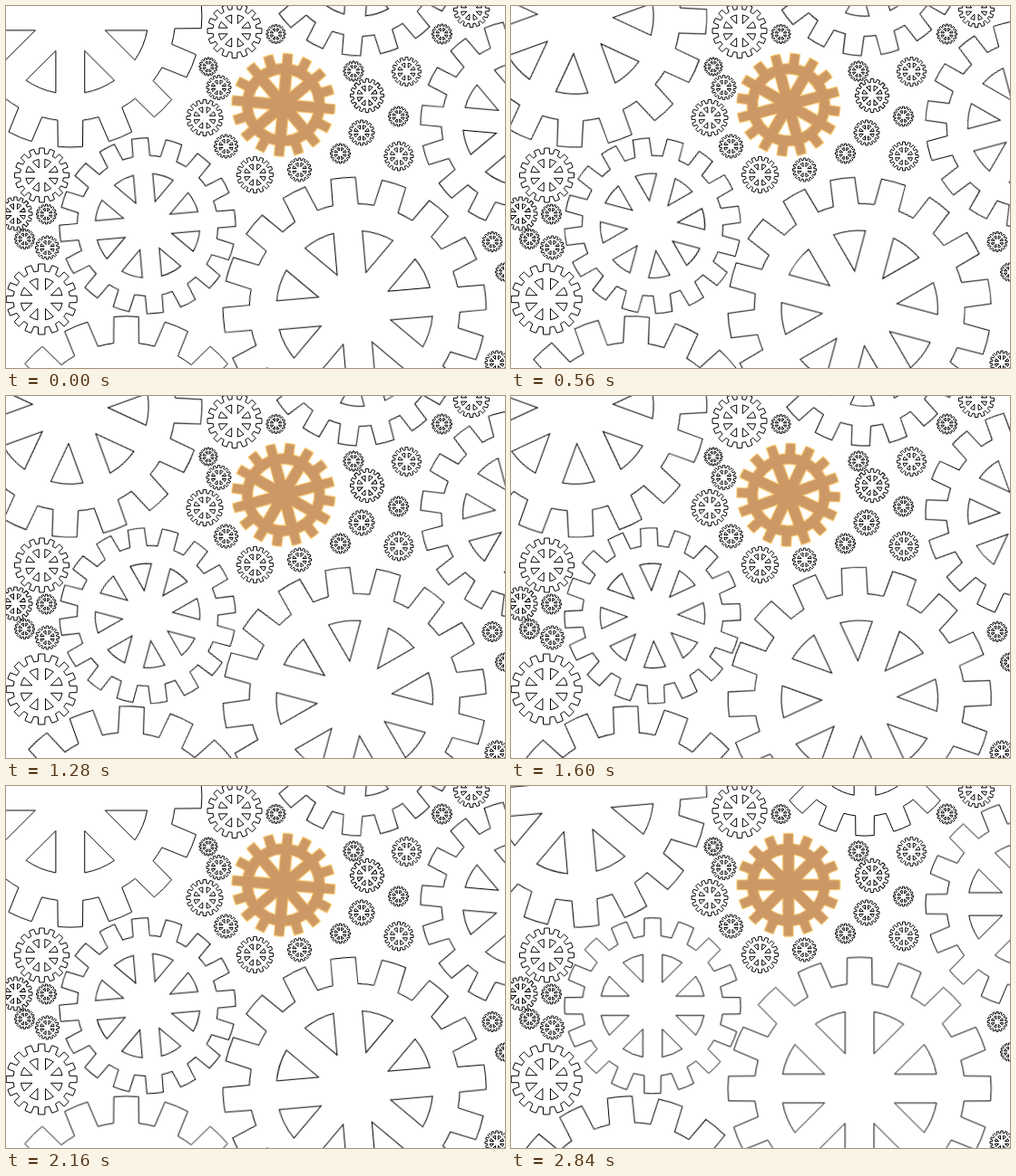
Animation of 550 by 400 pixels, one loop 2880 ms. Source, as an HTML page without scripts:

```html
<!DOCTYPE html>
<html lang="en">
<head>
<meta charset="utf-8">
<title>Gears</title>
<style>
  html, body { margin: 0; width: 100%; height: 100%; overflow: hidden; background: #fff; }
  svg { display: block; width: 550px; height: 400px; }
  path { vector-effect: non-scaling-stroke; }
  .gears { fill: none; stroke: #000; stroke-width: 1; }
  .lit { fill: #c96; stroke: #fc6; }
  .lit circle { stroke: none; }
  .cw { animation: cw 2880ms steps(72) infinite; }
  .ccw { animation: ccw 2880ms steps(72) infinite; }
  @keyframes cw { from { transform: rotate(0deg); } to { transform: rotate(360deg); } }
  @keyframes ccw { from { transform: rotate(0deg); } to { transform: rotate(-360deg); } }
</style>
</head>
<body>
<svg viewBox="0 0 550 400">
  <defs>
    <!-- unit gear of radius 100: 16 teeth, 8 holes -->
    <path id="tooth" d="M-9.6-79.4L-9.4-99.6A100 100 0 0 1 9.4-99.6L9.6-79.4A80 80 0 0 1 21.5-77.1"/>
    <path id="hole" d="M11-58.5A59.5 59.5 0 0 1 33.6-49.1L11-26.5Z"/>
    <g id="teeth2"><use href="#tooth"/><use href="#tooth" transform="rotate(22.5)"/></g>
    <g id="teeth4"><use href="#teeth2"/><use href="#teeth2" transform="rotate(45)"/></g>
    <g id="teeth8"><use href="#teeth4"/><use href="#teeth4" transform="rotate(90)"/></g>
    <g id="teeth"><use href="#teeth8"/><use href="#teeth8" transform="rotate(180)"/></g>
    <g id="holes2"><use href="#hole"/><use href="#hole" transform="rotate(45)"/></g>
    <g id="holes4"><use href="#holes2"/><use href="#holes2" transform="rotate(90)"/></g>
    <g id="holes"><use href="#holes4"/><use href="#holes4" transform="rotate(180)"/></g>
    <g id="gear"><use href="#teeth"/><use href="#holes"/></g>
  </defs>

  <g class="gears">
    <!-- large turning gears -->
    <g transform="translate(70.8 11) scale(1.45)"><use class="cw" href="#gear"/></g>
    <g transform="translate(132.5 487.8) scale(1.45)"><use class="cw" href="#gear"/></g>
    <g transform="translate(384.2 334.3) scale(1.45) rotate(-5)"><use class="ccw" href="#gear"/></g>
    <g transform="translate(156 242.8) scale(.97) rotate(-5)"><use class="ccw" href="#gear"/></g>
    <g transform="translate(572 130.5) scale(1.15) rotate(5)"><use class="cw" href="#gear"/></g>
    <g transform="translate(390 -53) scale(1.08) rotate(5)"><use class="cw" href="#gear"/></g>

    <!-- coloured gear -->
    <g class="lit" transform="translate(305.8 109.2) scale(.57) rotate(5)">
      <g class="cw">
        <circle r="80.5"/>
        <use href="#teeth"/>
        <use href="#holes" fill="#fff"/>
      </g>
    </g>

    <!-- small resting gears -->
    <use href="#gear" transform="translate(252 27.5) scale(.3)"/>
    <use href="#gear" transform="translate(297.5 31) scale(.105)"/>
    <use href="#gear" transform="translate(223 67) scale(.1)"/>
    <use href="#gear" transform="translate(234.5 90) scale(.135)"/>
    <use href="#gear" transform="translate(219 123.5) scale(.2)"/>
    <use href="#gear" transform="translate(242.5 155) scale(.13)"/>
    <use href="#gear" transform="translate(274.5 186.5) scale(.2)"/>
    <use href="#gear" transform="translate(323.5 181) scale(.13)"/>
    <use href="#gear" transform="translate(368.5 163) scale(.11)"/>
    <use href="#gear" transform="translate(383 72) scale(.11)"/>
    <use href="#gear" transform="translate(398 99) scale(.185)"/>
    <use href="#gear" transform="translate(441.5 72.5) scale(.16)"/>
    <use href="#gear" transform="translate(432.5 122) scale(.11)"/>
    <use href="#gear" transform="translate(392 140) scale(.14)"/>
    <use href="#gear" transform="translate(433 166) scale(.16)"/>
    <use href="#gear" transform="translate(480.5 31) scale(.11)"/>
    <use href="#gear" transform="translate(513 4) scale(.195)"/>
    <use href="#gear" transform="translate(536 260.5) scale(.11)"/>
    <use href="#gear" transform="translate(549.5 294) scale(.1)"/>
    <use href="#gear" transform="translate(541 394) scale(.13)"/>
    <use href="#gear" transform="translate(39.5 187) scale(.3)"/>
    <use href="#gear" transform="translate(10.5 229.5) scale(.185)"/>
    <use href="#gear" transform="translate(44.5 230) scale(.11)"/>
    <use href="#gear" transform="translate(20.5 257.5) scale(.11)"/>
    <use href="#gear" transform="translate(45.5 267) scale(.13)"/>
    <use href="#gear" transform="translate(39.2 324) scale(.39)"/>
  </g>
</svg>
</body>
</html>
```
